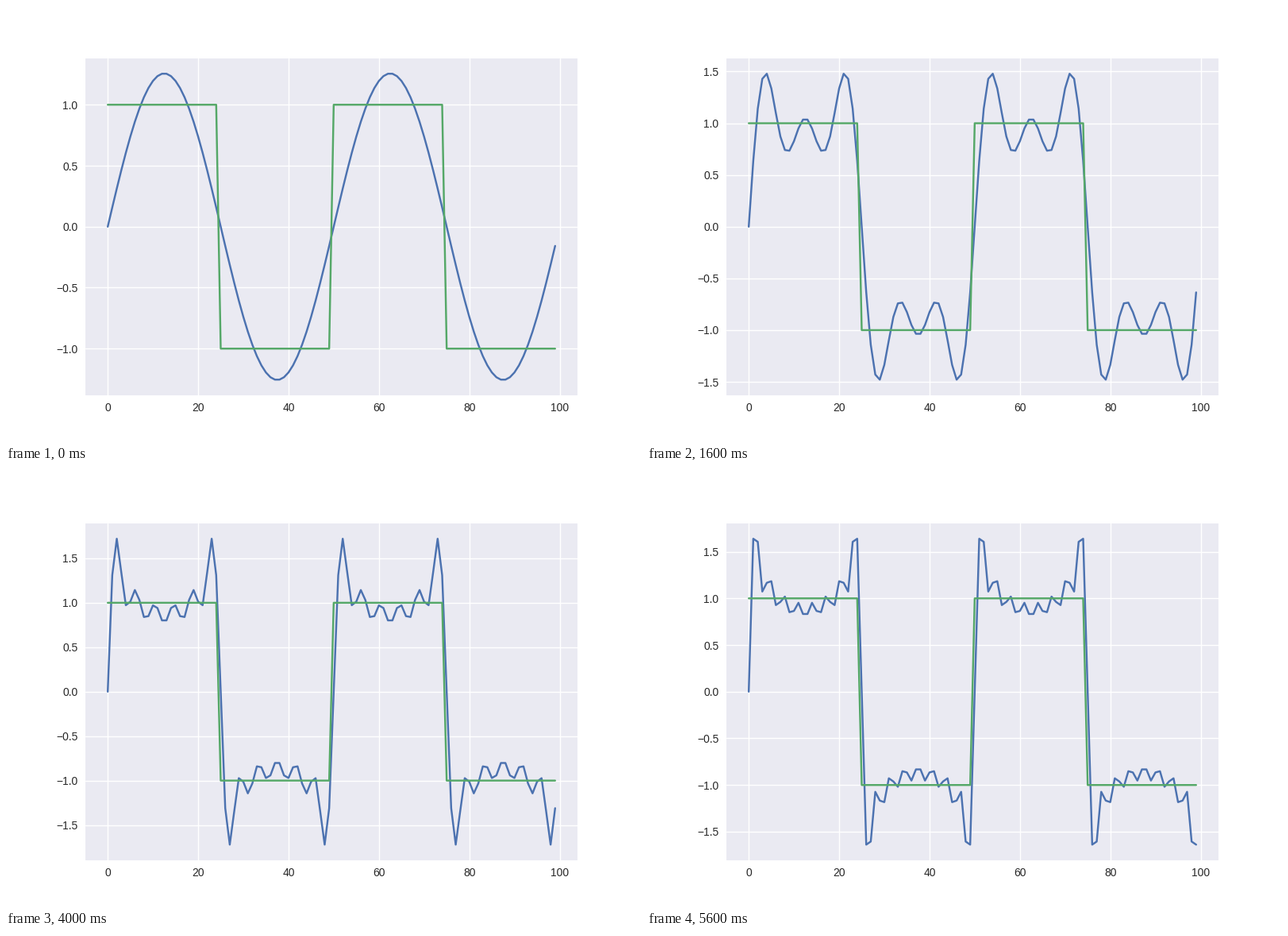
These frames come from a looping animation (800x550 px, 6400 ms). A matplotlib script:

```python
import numpy as np
import matplotlib.pyplot as plt
from matplotlib.animation import FuncAnimation

plt.style.use("seaborn-v0_8")
plt.rcParams["font.family"] = "Liberation Sans"

STEPS = 8
INTERVAL = 800
PERIOD = 50
AMPLITUDE = 0.4 * np.pi

n = np.arange(100)
square = np.where(n % PERIOD < PERIOD // 2, 1.0, -1.0)


def partial_sum(terms):
    """Sum the first odd harmonics, each weighted by 1/k."""
    k = np.arange(1, terms + 1)[:, None]
    waves = np.sin((2 * k - 1) * 2 * np.pi * n / PERIOD) / k
    return AMPLITUDE * waves.sum(axis=0)


fig, ax = plt.subplots(figsize=(8, 5.5), dpi=100)


def draw(step):
    ax.clear()
    wave, = ax.plot(n, partial_sum(step + 1))
    target, = ax.plot(n, square)
    return wave, target


anim = FuncAnimation(fig, draw, frames=STEPS, interval=INTERVAL, repeat=True)

plt.show()
```
